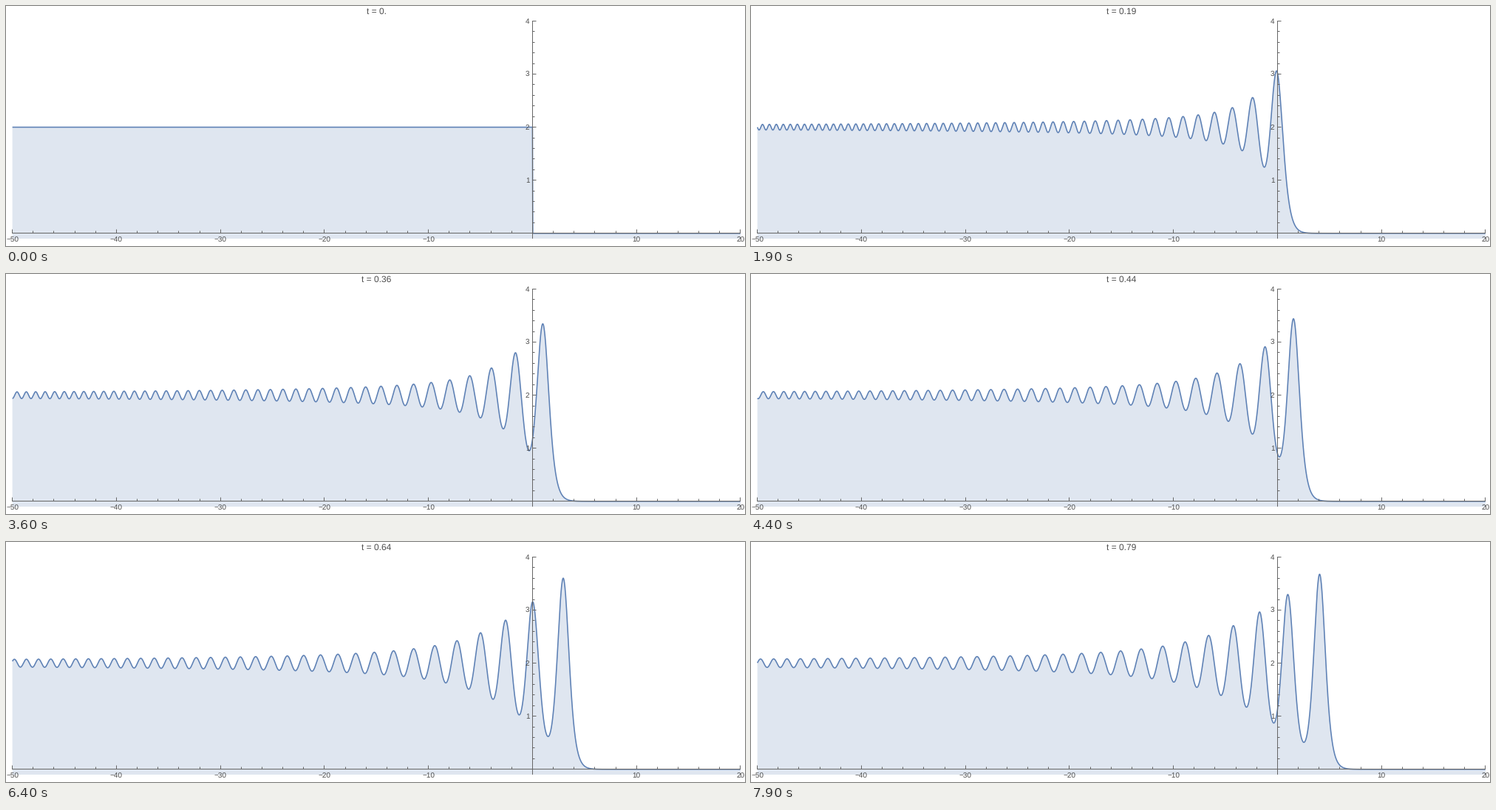
Recreate the animation shown at these times as a matplotlib script. Size 1000x326 px, loop 8000 ms.

```python
import math

import numpy as np
import matplotlib.pyplot as plt
from matplotlib.animation import FuncAnimation

W, H, DPI = 1000, 326, 100
FRAMES, INTERVAL = 80, 100
DT_FRAME = 0.01
BLUE = (0.368, 0.507, 0.710)
PALE = (0.873, 0.901, 0.942)
GRAY = "0.4"
INK = "0.3"

plt.rcParams["font.family"] = "Liberation Sans"
plt.rcParams["text.hinting"] = "none"


def pt(px):
    return px * 72 / DPI


def to_x(x):
    return 712.4 + 14.075 * x


def to_y(u):
    return 308.8 - 72.1 * u


def pixel(v):
    """Centre of the pixel that holds v."""
    return math.floor(v) + 0.5


# Step decay under the KdV equation u_t + 6 u u_x + u_xxx = 0,
# solved spectrally with an absorbing layer far to the left.
N, LENGTH, LEFT = 4096, 128, -96
x = LEFT + np.arange(N) * LENGTH / N
k = 2 * np.pi * np.arange(N // 2 + 1) / LENGTH
nonlin = -3j * k * (k < k[-1] * 2 / 3)
step = np.heaviside(-x, 0.5) * (1 + np.tanh((x + 85) / 2))
sponge = 5000 * np.exp(-((x + 82) / 9) ** 2)


def advance(v, dt, steps):
    half = np.exp(0.5j * k**3 * dt)
    full = half * half
    damp = np.exp(-sponge * dt)

    def rate(w):
        return nonlin * np.fft.rfft(np.fft.irfft(w, N) ** 2)

    for _ in range(steps):
        a = rate(v)
        b = rate(half * (v + dt / 2 * a))
        c = rate(half * v + dt / 2 * b)
        d = rate(full * v + dt * half * c)
        v = full * v + dt / 6 * (full * a + 2 * half * (b + c) + d)
        u = np.fft.irfft(v, N)
        v = np.fft.rfft(step + (u - step) * damp)
    return v


def solve():
    v = np.fft.rfft(step) * np.exp(-((k / 60) ** 6))
    waves = [2.0 * (x <= 0)]
    for i in range(1, FRAMES):
        steps = 400 if i == 1 else 50
        v = advance(v, DT_FRAME / steps, steps)
        waves.append(np.fft.irfft(v, N))
    return waves


shown = (x >= -50) & (x <= 20)
px = to_x(x[shown])
curves = [to_y(u[shown]) for u in solve()]

fig = plt.figure(figsize=(W / DPI, H / DPI), dpi=DPI, facecolor="white")
ax = fig.add_axes([0, 0, 1, 1])
ax.set_xlim(0, W)
ax.set_ylim(H, 0)
ax.axis("off")

BOTTOM = 316
area = ax.fill([0, 0, 0], [0, 0, 0], color=PALE, lw=0, zorder=1,
               snap=False)[0]
line, = ax.plot([], [], color=BLUE, lw=pt(1.6), zorder=2, snap=False,
                solid_joinstyle="round", solid_capstyle="butt")
title = ax.text(501, 11, "", size=pt(12), color=INK, ha="center",
                va="baseline")


def rule(xs, ys):
    ax.plot(xs, ys, color=GRAY, lw=pt(1), zorder=3, snap=False,
            solid_capstyle="butt")


def label(x0, y0, text, align):
    ax.text(x0, y0, text, size=pt(10), color=INK, ha=align, va="baseline",
            zorder=4)


def draw_axes():
    x0, y0 = pixel(to_x(0)), pixel(to_y(0))
    rule([pixel(to_x(-50)) - 0.5, pixel(to_x(20)) + 0.5], [y0, y0])
    rule([x0, x0], [pixel(to_y(4)) - 0.5, BOTTOM])
    for n in range(-50, 21, 2):
        if n == 0:
            continue
        major = n % 10 == 0
        rule([pixel(to_x(n))] * 2, [y0, y0 - (5 if major else 3)])
        if major:
            label(to_x(n), 321, str(n).replace("-", "\u2212"), "center")
    for n in range(1, 21):
        y = pixel(to_y(n / 5))
        major = n % 5 == 0
        rule([x0, x0 + (5 if major else 3)], [y, y])
        if major:
            label(708.5, y + 3.6, str(n // 5), "right")


def update(i):
    y = curves[i]
    line.set_data(px, y)
    outline = np.column_stack([px, y])
    area.set_xy(np.vstack([[px[0], BOTTOM], outline, [px[-1], BOTTOM]]))
    number = f"{i * DT_FRAME:.2f}".rstrip("0")
    title.set_text(f"t = {number}")
    return area, line, title


draw_axes()
anim = FuncAnimation(fig, update, frames=FRAMES, interval=INTERVAL,
                     init_func=lambda: update(0), repeat=True,
                     repeat_delay=0)
plt.show()
```
